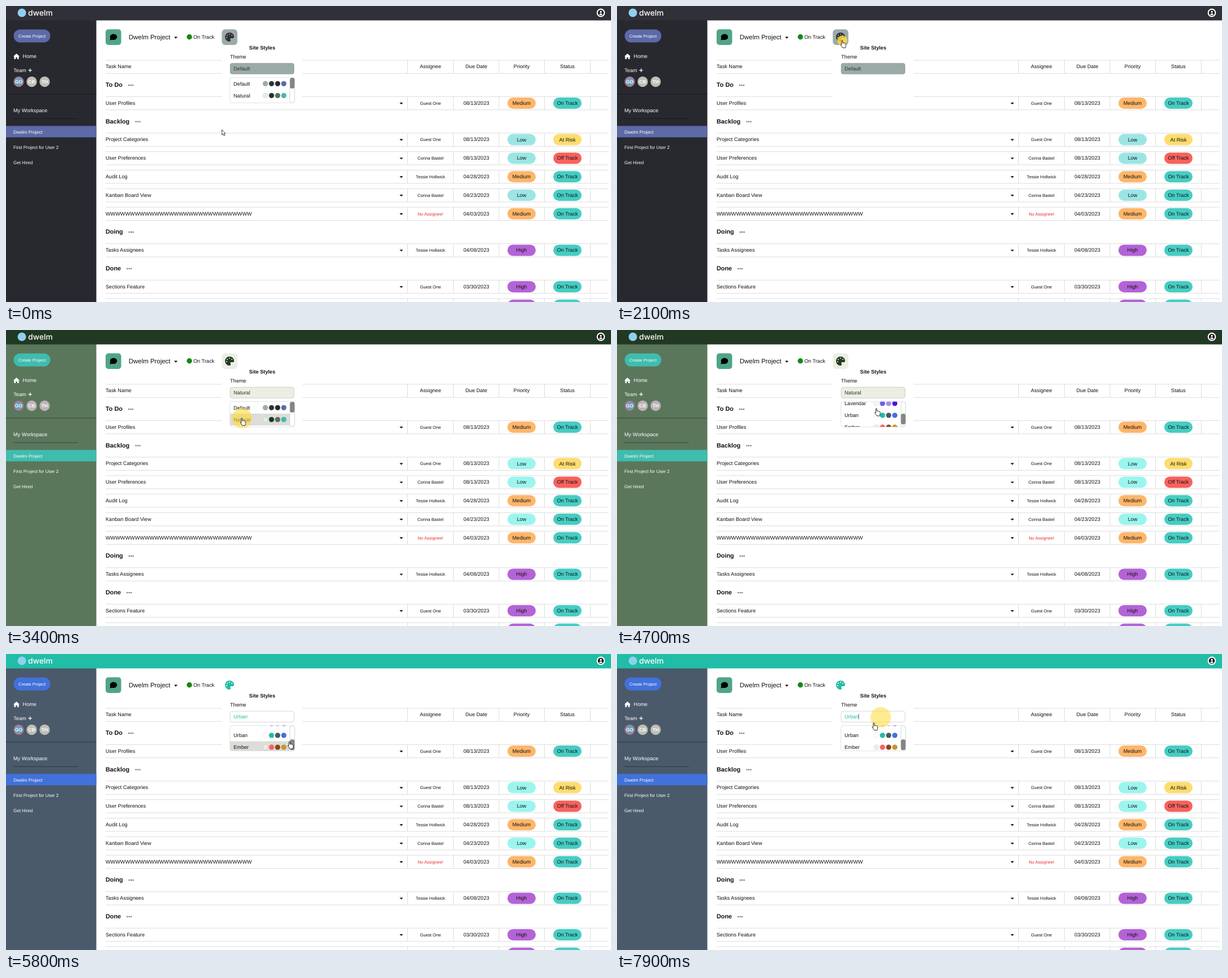
These frames come from a looping animation (1069x524 px, 8000 ms). An HTML page:

```html
<!DOCTYPE html>
<html lang="en">
<head>
<meta charset="utf-8">
<title>Project board themes</title>
<style>
  html, body { margin: 0; width: 100%; height: 100%; overflow: hidden; background: #fff; }
  svg { display: block; width: 100vw; height: 100vh; }
  text { font: 9.14px "Liberation Sans", Arial, sans-serif; fill: #111; text-rendering: geometricPrecision; white-space: pre; }
  .mid { text-anchor: middle; }
  .light { fill: #fff; }
  .small { font-size: 7.65px; }
  .nav { font-size: 8px; }
  .bold { font-weight: bold; }
  .head { fill: var(--head); }
  .side { fill: var(--side); }
  .accent { fill: var(--accent); }
  .field { fill: var(--field); }
  .grid { stroke: #dcdcdc; fill: none; }
</style>
</head>
<body>
<svg id="stage" viewBox="0 0 1069 524" preserveAspectRatio="none"></svg>
<script>
const themes = [
  { name: 'Default', dots: ['#9fadab', '#303038', '#28282f', '#5d6aa8'],
    head: '#303038', side: '#28282f', accent: '#5d6aa8', field: '#9aaba8', low: '#9be6e4', avatar: '#bfbeb6' },
  { name: 'Natural', dots: ['#e2edec', '#20371f', '#56705a', '#40bcae'],
    head: '#213922', side: '#5a775c', accent: '#40bcae', field: '#eceee3', low: '#9bf5ee', avatar: '#bdb3b8' },
  { name: 'Lavendar', dots: ['#eefaf6', '#6f5de0', '#a68cf0', '#4a12e6'] },
  { name: 'Urban', dots: ['#ffffff', '#21bda6', '#46586a', '#4171da'],
    head: '#21bda6', side: '#4a5a6a', accent: '#4171da', field: '#ffffff', low: '#9bf5ee', avatar: '#bfbeb6' },
  { name: 'Ember', dots: ['#f2ebe6', '#fa6262', '#8f4412', '#c9962c'] }
];
const pillColors = {
  Low: 'var(--low)', Medium: '#feb66a', High: '#b463d6',
  'On Track': '#46cdc3', 'At Risk': '#fddd6e', 'Off Track': '#f7625d'
};
const brand = 'Dwelm';
const people = ['Guest One', 'Corina Bastel', 'Tessie Hollwick'];
const columns = [709.5, 790.5, 871, 951.5, 1032.5];
const centers = [750, 831, 911, 992];

// Markup helpers
const text = (x, y, s, cls = '', extra = '') => `<text x="${x}" y="${y}" class="${cls}" ${extra}>${s}</text>`;
const rect = (x, y, w, h, r, attrs) => `<rect x="${x}" y="${y}" width="${w}" height="${h}" rx="${r}" ${attrs}/>`;
const dot = (x, y, r, attrs) => `<circle cx="${x}" cy="${y}" r="${r}" ${attrs}/>`;
const path = (d, attrs = '') => `<path d="${d}" ${attrs}/>`;
const caret = (x, y) => path(`M${x - 3} ${y - 1.5}h6l-3 3.2z`);
const cellLines = y => path(
  `M176 ${y - 11.6}H1065M176 ${y + 11.8}H1065` + columns.map(x => `M${x} ${y - 11}v22.5`).join(''), 'class="grid"');
const pill = (x, y, s) => rect(x - 25, y - 10, 50, 20, 10, `fill="${pillColors[s]}"`) + text(x, y + 2.9, s, 'mid');

function row(y, task, who, date, priority, status) {
  const name = people[who] || 'No Assignee!';
  return cellLines(y) + text(176, y + 2.8, task) + caret(698.5, y + .5) +
    text(750, y + 2.8, name, 'mid small', people[who] ? '' : 'style="fill:#e0302a"') +
    text(831, y + 2.8, date, 'mid') + pill(911, y, priority) + pill(992, y, status);
}

function section(y, name, dotsX) {
  return text(176, y + 3.8, name, 'bold', 'style="font-size:10.85px"') +
    [-3.4, 0, 3.4].map(d => dot(dotsX + d, y + .7, 1.25, 'fill="#777"')).join('');
}

function sidebar() {
  const avatars = people.map((p, i) => {
    const x = 22.5 + 22.9 * i;
    const look = i ? 'style="fill:var(--avatar)"' : 'fill="#6c9cbd" stroke="#dc5a62" stroke-width="1.2"';
    return dot(x, 134, i ? 9.2 : 8.6, look) +
      text(x, 137, p.split(' ').map(w => w[0]).join(''), 'mid light bold', 'style="font-size:8.4px"');
  }).join('');
  return rect(0, 25, 159.6, 499, 0, 'class="side"') +
    rect(13.5, 41.5, 64.8, 23, 11.5, 'class="accent"') +
    text(46, 56, 'Create Project', 'mid light', 'style="font-size:7.5px"') +
    path('M18.5 84.3l5.6 5h-1.5v4.8h-2.8v-3h-2.6v3h-2.8v-4.8h-1.5z', 'fill="#fff"') +
    text(29.6, 92.4, 'Home', 'light') + text(13.3, 116.8, 'Team', 'light') +
    path('M39.3 113.8h6.6M42.6 110.5v6.6', 'stroke="#fff" stroke-width="1.2"') + avatars +
    path('M0 156h159.6M13 199.3h114', 'stroke="#0006"') +
    text(13, 188.3, 'My Workspace', 'light') +
    rect(0, 212.3, 159.6, 20.2, 0, 'class="accent"') +
    [brand + ' Project', 'First Project for User 2', 'Get Hired']
      .map((s, i) => text(13, [225.5, 253, 279.6][i], s, 'nav light')).join('');
}

function topbar() {
  return rect(0, 0, 1069, 25.5, 0, 'class="head"') + dot(28, 12, 7.5, 'fill="#8fd0ee"') +
    text(39, 16.7, brand.toLowerCase(), 'light', 'style="font:500 13.8px Inter,sans-serif"') +
    dot(1051, 12, 7.4, 'fill="#fff"') + dot(1051, 12, 5.2, 'fill="#111"') +
    dot(1051, 10.4, 1.8, 'fill="#fff"') + path('M1048 15.2q.4-2.2 3-2.2t3 2.2q-3 2-6 0z', 'fill="#fff"');
}

function toolbar() {
  const holes = [[96, 288], [128, 160], [256, 96], [384, 160]];
  return rect(176, 41.3, 27.5, 27.7, 5, 'fill="#50a586"') +
    `<ellipse cx="190" cy="54.8" rx="6.3" ry="5.2"/>` + path('M184.8 56l-1.6 4.6 5.6-1z') +
    text(216.8, 59.2, brand + ' Project', '', 'style="font-size:11.45px"') + caret(300, 56) +
    dot(324, 54.7, 4.7, 'fill="#128a12"') + text(331, 58, 'On Track') +
    rect(381.3, 41.3, 27.5, 27.7, 6, 'id="button" class="field"') +
    `<g transform="translate(387 47) scale(.0313)">` +
    path('M512 256c0 40-33 64-70 64h-98c-26 0-48 21-48 48 0 30 24 50 24 82 0 32-22 62-64 62A256 256 0 1 1 512 256z', 'class="head"') +
    holes.map(([x, y]) => dot(x, y, 34, 'id="hole" class="field"')).join('').replace(/ id="hole"/g, '') + '</g>';
}

function table() {
  return cellLines(107.6) + text(176, 110.4, 'Task Name') +
    ['Assignee', 'Due Date', 'Priority', 'Status'].map((s, i) => text(centers[i], 110.4, s, 'mid')).join('') +
    section(139.6, 'To Do', 220.5) +
    row(172, 'User Profiles', 0, '08/13/2023', 'Medium', 'On Track') +
    section(204, 'Backlog', 233) +
    row(236.6, 'Project Categories', 0, '08/13/2023', 'Low', 'At Risk') +
    row(269.4, 'User Preferences', 1, '08/13/2023', 'Low', 'Off Track') +
    row(302.2, 'Audit Log', 2, '04/28/2023', 'Medium', 'On Track') +
    row(335, 'Kanban Board View', 1, '04/23/2023', 'Low', 'On Track') +
    row(367.8, 'W'.repeat(30), -1, '04/03/2023', 'Medium', 'On Track') +
    section(399.6, 'Doing', 221.2) +
    row(432.4, 'Tasks Assignees', 2, '04/08/2023', 'High', 'On Track') +
    section(464.2, 'Done', 217.6) +
    row(496.9, 'Sections Feature', 0, '03/30/2023', 'High', 'On Track') +
    row(529.7, 'Task Lists', 0, '03/30/2023', 'High', 'On Track');
}

function popup() {
  const items = themes.map((th, i) => {
    const y = 137.5 + 21 * i;
    return text(402, y + 3, th.name) + th.dots.map((c, k) =>
      dot(458.3 + 10.85 * k, y, 4.5, `fill="${c}" stroke="#0002" stroke-width=".6"`)).join('');
  }).join('');
  return `<g id="popup">` + rect(381, 69.2, 143, 112, 0, 'fill="#fff"') +
    text(452.7, 76.8, 'Site Styles', 'mid bold') + text(396, 93, 'Theme') +
    rect(396, 101.2, 113, 19.3, 4, 'class="field" stroke="#0003" stroke-width=".8"') +
    text(402, 114, '', '', 'id="choice"') +
    path('M427 106v9.5', 'id="caret" stroke="#333" stroke-width=".8"') +
    `<g id="list"><clipPath id="clip">${rect(395.7, 126.7, 114.3, 44.8, 4, '')}</clipPath>` +
    rect(395.7, 126.7, 114.3, 44.8, 4, 'fill="#fff" stroke="#d8dcdc" stroke-width=".8"') +
    `<g clip-path="url(#clip)"><g id="items">` + rect(396, 0, 105.5, 21, 0, 'id="hover" fill="#dcdcd8"') + items + '</g></g>' +
    rect(501.6, 127, 8.2, 44.2, 4, 'fill="#fff" stroke="#cfd8d8" stroke-width=".9"') +
    rect(501.8, 127.2, 8, 18.8, 3, 'id="thumb" fill="#858585"') + '</g></g>';
}

const pointers =
  path('M0 0v9.3l2.1-1.9 1.5 3.3 1.5-.7-1.5-3.2h2.8z', 'id="arrow" fill="#fff" stroke="#111" stroke-width=".8"') +
  path('M-1.2 1c0-1.5 2-1.5 2 0v3.8c.3-.9 1.9-.8 2 .2.5-.7 1.8-.4 1.9.5.6-.5 1.8-.1 1.8.9v3.1c0 1.4-.8 2-.8 3.5h-5.1c-.7-1.8-2.4-3-3.4-4.9-.5-1.2.7-1.8 1.6-.6z',
    'id="hand" fill="#fff" stroke="#111" stroke-width=".9" stroke-linejoin="round"');

const stage = document.getElementById('stage');
stage.innerHTML = rect(0, 0, 1069, 524, 0, 'fill="#fff"') + table() + toolbar() + sidebar() + topbar() + popup() +
  dot(0, 0, 0, 'id="ripple" fill="#ffdc3c"') + `<g id="pointer">${pointers}</g>`;

const el = id => document.getElementById(id);
const show = (id, on) => el(id).setAttribute('visibility', on ? 'inherit' : 'hidden');
const set = (id, attrs) => { for (const k in attrs) el(id).setAttribute(k, attrs[k]); };

// Keyframes: time, then values
const moves = [
  [0, 381.5, 219], [900, 381.5, 219], [1100, 398, 61], [2100, 398, 61], [2400, 432, 113], [2500, 432, 113],
  [2800, 428.5, 143], [3050, 417, 156], [3800, 417, 156], [4100, 440, 145], [4300, 440, 145], [4700, 458.5, 139],
  [5000, 458.5, 139], [5200, 450, 144], [5300, 450, 144], [5800, 501, 155], [6100, 501, 155], [6800, 485, 142],
  [7000, 485, 142], [7500, 466, 112], [7650, 466, 112], [7900, 454, 122]
];
const scrolls = [[4300, 0], [4700, 49.5], [4800, 56.5]];
const clicks = [[1100, 398, 61], [2000, 398, 61], [2400, 432, 113], [3050, 417, 156], [5200, 450, 144], [7500, 466, 112]];

function sample(keys, t) {
  if (t <= keys[0][0]) return keys[0].slice(1);
  const i = keys.findIndex(k => k[0] > t);
  if (i < 0) return keys[keys.length - 1].slice(1);
  const a = keys[i - 1], b = keys[i], p = (t - a[0]) / (b[0] - a[0]), e = p * p * (3 - 2 * p);
  return a.slice(1).map((v, k) => v + (b[k + 1] - v) * e);
}

function draw(now) {
  const t = now % 8000;
  const theme = themes[t < 3100 ? 0 : t < 5200 ? 1 : 3];
  for (const k of ['head', 'side', 'accent', 'field', 'low', 'avatar']) stage.style.setProperty('--' + k, theme[k]);

  const open = t < 1100 || t >= 2050;
  show('popup', open);
  show('button', open);
  show('list', t < 1100 || t >= 2450);
  show('caret', t >= 7550);
  el('choice').textContent = theme.name;
  el('choice').style.fill = theme.head;

  const [x, y] = sample(moves, t), [scroll] = sample(scrolls, t);
  const scrolling = t > 4300 && t < 4800;
  const inList = x > 396 && x < 510 && y > 127 && y < 171;
  set('items', { transform: `translate(0 ${-scroll})` });
  set('thumb', { y: 127.2 + scroll * .425 });
  set('hover', { y: 127 + 21 * Math.floor((y - 126.8 + scroll) / 21), opacity: inList && !scrolling ? 1 : 0 });

  const click = clicks.find(c => t >= c[0] && t < c[0] + 500);
  show('ripple', click);
  if (click) {
    const age = t - click[0], p = Math.min(1, age / 400);
    set('ripple', { cx: click[1], cy: click[2], r: 18 * (1 - (1 - p) ** 2.3), opacity: .95 * (1 - age / 1000) });
  }

  set('pointer', { transform: `translate(${x} ${y})` });
  const arrow = t < 1050;
  show('arrow', arrow);
  show('hand', !arrow);
}

const start = performance.now();
function tick() {
  draw(performance.now() - start);
  requestAnimationFrame(tick);
}
tick();
</script>
</body>
</html>
```
